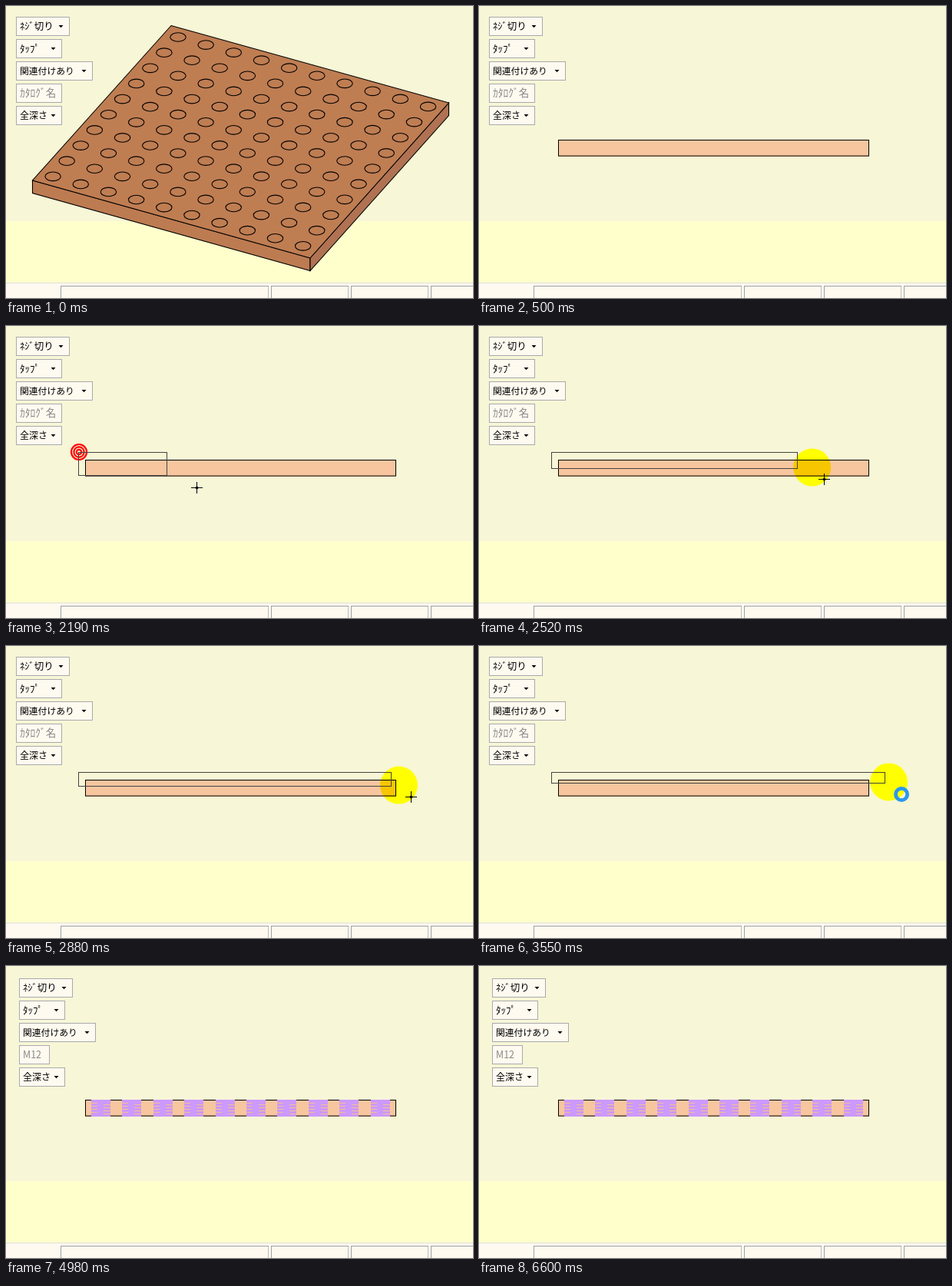
Recreate the animation shown at these times as an HTML page with a canvas. Size 608 px wide and 380 px high, loop 8 s.

```html
<!DOCTYPE html>
<html lang="ja">
<head>
<meta charset="utf-8">
<style>
html, body { margin: 0; width: 608px; height: 380px; overflow: hidden; background: #f7f6d6; }
canvas { display: block; }
</style>
</head>
<body>
<canvas id="stage" width="608" height="380"></canvas>
<script>
const c = document.getElementById('stage').getContext('2d');
const LOOP = 8000;

// Pointer path: time, x, y
const path = [
  [1130, 8, 272], [1280, 95.5, 239.5], [1370, 102, 212], [1640, 95, 164],
  [1800, 95, 164], [2190, 232, 195.2], [2520, 433.5, 184], [2580, 444, 184],
  [3000, 522.5, 180.4], [3400, 522.5, 180.4], [3550, 533.5, 177],
  [3850, 555, 168.5], [4770, 555, 168.5], [4980, 655, 153]
];
const clicks = [
  { start: 1800, end: 2250, x: 95, y: 164 },
  { start: 3300, end: 3500, x: 522.5, y: 180.5 }
];

const slope = (i, k) => (path[i + 1][k] - path[i][k]) / (path[i + 1][0] - path[i][0]);

function tangent(i, k) {
  if (i === 0) return slope(0, k);
  if (i === path.length - 1) return slope(i - 1, k);
  const a = slope(i - 1, k), b = slope(i, k);
  return a * b > 0 ? 2 * a * b / (a + b) : 0;
}

// Monotone cubic through the path points
function pointer(t) {
  let i = 0;
  while (i < path.length - 2 && t >= path[i + 1][0]) i++;
  const span = path[i + 1][0] - path[i][0];
  const u = Math.min(1, Math.max(0, (t - path[i][0]) / span));
  const s = u * u * (3 - 2 * u);
  const [x, y] = [1, 2].map(k =>
    path[i][k] * (1 - s) + path[i + 1][k] * s +
    span * u * (1 - u) * ((1 - u) * tangent(i, k) - u * tangent(i + 1, k)));
  return { x, y };
}

function rect(x, y, w, h, color) {
  c.fillStyle = color;
  c.fillRect(x, y, w, h);
}

function outline(x, y, w, h, color) {
  c.strokeStyle = color;
  c.lineWidth = 1;
  c.strokeRect(x, y, w, h);
}

function poly(points, fill, stroke) {
  c.beginPath();
  points.forEach(p => c.lineTo(...p));
  c.closePath();
  c.fillStyle = fill;
  c.fill();
  if (stroke) {
    c.strokeStyle = stroke;
    c.lineWidth = 1.1;
    c.stroke();
  }
}

function circle(x, y, r, color, width) {
  c.beginPath();
  c.arc(x, y, r, 0, 7);
  c.fillStyle = c.strokeStyle = color;
  c.lineWidth = width;
  if (width) c.stroke(); else c.fill();
}

function background() {
  rect(0, 0, 608, 280, '#f7f6d6');
  rect(0, 280, 608, 80, '#ffffcc');
  rect(0, 360, 608, 20, '#fffaf0');
  rect(0, 360, 608, 1, '#dedede');
  [[71, 271], [345, 101], [449, 101], [553, 101]].forEach(([x, w]) => {
    rect(x, 364, w, 1, '#a0a0a0');
    rect(x, 364, 1, 16, '#a0a0a0');
    rect(x + w - 1, 365, 1, 15, '#bcbcbc');
  });
}

function panel(done) {
  const dx = done ? 4 : 0, dy = done ? 2 : 0;
  const rows = [
    ['ﾈｼﾞ切り', 70, 12.5], ['ﾀｯﾌﾟ', 60, 13], ['関連付けあり', 100, 11.8],
    done ? ['M12', 40, 12.5] : ['ｶﾀﾛｸﾞ名', 60, 13.5], ['全深さ', 60, 12]
  ];
  c.textBaseline = 'alphabetic';
  rows.forEach(([label, w, size], i) => {
    const x = 13 + dx, y = 14 + dy + 29 * i, locked = i === 3;
    rect(x, y, w, 25, '#fffaf0');
    outline(x + .5, y + .5, w - 1, 24, '#a9a9ad');
    c.font = `${size}px "Noto Sans CJK JP", "Noto Sans CJK", sans-serif`;
    c.fillStyle = locked ? '#888' : '#000';
    c.fillText(label, x + 5, y + 17);
    const a = x + w - 11.5;
    if (!locked) poly([[a - 3, y + 11], [a + 3, y + 11], [a, y + 14.2]], '#000');
  });
}

function plate() {
  const left = [34.5, 227], front = [396, 328], right = [576.5, 126];
  const down = ([x, y]) => [x, y + 16.5];
  poly([left, front, down(front), down(left)], '#bd7b51', '#000');
  poly([front, right, down(right), down(front)], '#b07252', '#000');
  poly([[215, 25.5], right, front, left], '#bf7d52', '#000');
  for (let i = 0; i < 10; i++) {
    for (let j = 0; j < 10; j++) {
      c.beginPath();
      c.ellipse(224 + 36.17 * i - 18.1 * j, 40.5 + 10.05 * i + 20.15 * j, 10.2, 5.8, 0, 0, 7);
      c.stroke();
    }
  }
}

function sideView(drilled) {
  rect(103, 174, 405, 22, '#f7c69f');
  outline(103.5, 174.5, 404, 20.6, '#000');
  if (!drilled) return;
  for (let i = 0; i < 10; i++) {
    const x = Math.round(111 + 40.4 * i);
    rect(x, 174, 25, 22, '#cc99ff');
    for (let y = 178; y < 194; y += 4) {
      rect(x, y, 8, 1, '#f4c08c');
      rect(x + 16, y + 2, 9, 1, '#f4c08c');
    }
  }
}

function crosshair(x, y) {
  x = Math.round(x);
  y = Math.round(y);
  rect(x - 7, y, 15, 1, '#000');
  rect(x, y - 7, 1, 15, '#000');
  rect(x - 1, y - 1, 3, 3, '#000');
}

function arrow(x, y) {
  poly([[0, 0], [0, 16], [3.7, 12.6], [6.2, 18.4], [8.8, 17.3], [6.3, 11.7], [11, 11.4]]
    .map(([a, b]) => [x + a, y + b]), '#fff', '#000');
}

function draw(t) {
  background();
  panel(t >= 3970);
  if (t < 500) return plate();

  const sweep = t >= 6510 && t < 6600;
  const step = Math.floor((t - 6510) / 30);
  const p = sweep ? { x: 552 - 268 * step, y: 138 + 30.5 * step } : pointer(t);
  const shown = sweep || t >= 1130 && t < 4980;
  const click = clicks.find(k => t >= k.start && t < k.end);
  const glow = shown && !click;

  if (glow) circle(p.x, p.y, 24.5, '#ff0');
  sideView(t >= 4770);
  if (glow) {
    c.save();
    c.beginPath();
    c.rect(103, 174, 405, 22);
    c.clip();
    c.globalCompositeOperation = 'multiply';
    circle(p.x, p.y, 24.5, '#ff0');
    c.restore();
  }

  if (click) {
    const grow = Math.min(1, .35 + (t - click.start) / 300);
    [3.2, 6.6, 10].forEach(r => circle(click.x, click.y, r * grow, '#f00', 2.2));
  }
  if (t >= 1800 && t < 3970) {
    const q = pointer(Math.max(1800, t - 49));
    outline(94.5, 164.5, Math.round(q.x - 95), Math.round(q.y - 164), '#444');
  }
  if (!shown) return;
  if (t < 1310) arrow(p.x + 1.5, p.y + 1);
  else if (t >= 3400 && t < 4470) circle(p.x + 16.5, p.y + 16, 7.6, '#2c98ee', 4.8);
  else crosshair(p.x + 15.7, p.y + 15);
}

function tick() {
  draw(performance.now() % LOOP);
  requestAnimationFrame(tick);
}
tick();
</script>
</body>
</html>
```
